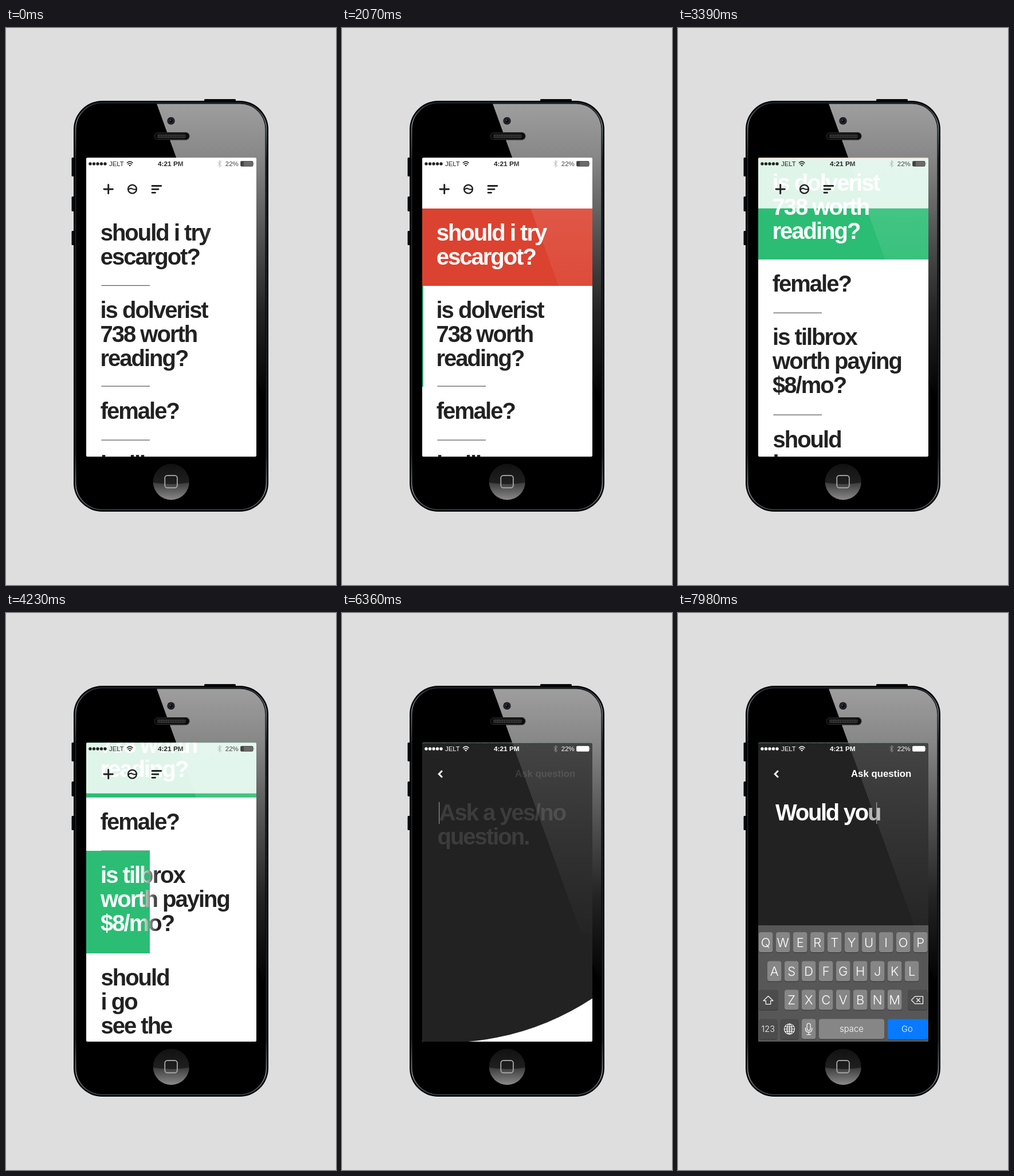
Recreate the animation shown at these times as an HTML page. Size 576 px wide and 972 px high, loop 8000 ms.

```html
<!DOCTYPE html>
<html lang="en">
<head>
<meta charset="utf-8">
<title>Yes/no questions</title>
<style>
html, body { margin: 0; width: 100%; height: 100%; overflow: hidden; background: #dedede; }
svg { display: block; width: 100vw; height: 100vh; }
text { font-family: "Liberation Sans", Arial, sans-serif; white-space: pre; }
.big { font-size: 40px; font-weight: 700; letter-spacing: -2px; }
.key { font-family: Inter, "Liberation Sans", sans-serif; font-weight: 300; fill: #fff; text-anchor: middle; }
.line { fill: none; stroke-linecap: round; stroke-linejoin: round; }
</style>
</head>
<body>
<svg viewBox="0 0 576 972" xmlns="http://www.w3.org/2000/svg">
  <defs>
    <clipPath id="screen"><rect x="140" y="226.5" width="297" height="521.5" rx="2"/></clipPath>
    <clipPath id="reveal"><circle id="hole" cx="179" cy="281" r="0"/></clipPath>
    <clipPath id="face"><rect x="123.5" y="132.5" width="329" height="707" rx="44"/></clipPath>
    <clipPath id="home"><circle cx="288.3" cy="792" r="31.5"/></clipPath>
    <linearGradient id="bezelGlare" gradientUnits="userSpaceOnUse" x1="0" y1="132" x2="0" y2="650">
      <stop offset="0" stop-color="#fff" stop-opacity=".62"/>
      <stop offset=".18" stop-color="#fff" stop-opacity=".53"/>
      <stop offset=".42" stop-color="#fff" stop-opacity=".34"/>
      <stop offset=".7" stop-color="#fff" stop-opacity=".14"/>
      <stop offset="1" stop-color="#fff" stop-opacity="0"/>
    </linearGradient>
    <linearGradient id="screenGlare" gradientUnits="userSpaceOnUse" x1="0" y1="226" x2="0" y2="560">
      <stop offset="0" stop-color="#fff" stop-opacity=".155"/>
      <stop offset=".5" stop-color="#fff" stop-opacity=".075"/>
      <stop offset="1" stop-color="#fff" stop-opacity=".01"/>
    </linearGradient>
    <linearGradient id="rim" gradientUnits="userSpaceOnUse" x1="0" y1="131" x2="0" y2="841">
      <stop offset="0" stop-color="#20282c"/>
      <stop offset=".05" stop-color="#6f7e88"/>
      <stop offset=".14" stop-color="#1c2428"/>
      <stop offset=".86" stop-color="#1a2226"/>
      <stop offset=".95" stop-color="#7d878d"/>
      <stop offset="1" stop-color="#394247"/>
    </linearGradient>
    <linearGradient id="homeTop" x1="0" y1="0" x2="0" y2="1">
      <stop offset="0" stop-color="#111"/><stop offset="1" stop-color="#2c2c2c"/>
    </linearGradient>
    <linearGradient id="homeLow" x1="0" y1="0" x2="0" y2="1">
      <stop offset="0" stop-color="#3a3a3a"/><stop offset="1" stop-color="#8e8e8e"/>
    </linearGradient>
    <pattern id="mesh" width="3" height="3" patternUnits="userSpaceOnUse">
      <rect width="3" height="3" fill="#151515"/><circle cx="1.5" cy="1.5" r=".95" fill="#5a5a5a"/>
    </pattern>
  </defs>

  <rect width="576" height="972" fill="#dedede"/>

  <g fill="#080b0d">
    <rect x="114.5" y="226" width="8" height="33" rx="1.5"/>
    <rect x="114.5" y="294" width="8" height="26" rx="1.5"/>
    <rect x="114.5" y="354" width="8" height="25" rx="1.5"/>
    <rect x="346" y="124" width="55" height="8" rx="1.5"/>
  </g>
  <rect x="118" y="127" width="340" height="717" rx="50" fill="#020303"/>
  <rect x="121.5" y="130.5" width="333" height="710" rx="46.5" fill="none" stroke="url(#rim)" stroke-width="1.8"/>
  <rect x="123.5" y="132.5" width="329" height="707" rx="44" fill="#000"/>
  <path d="M263 132H453V650H450.7Z" fill="url(#bezelGlare)" clip-path="url(#face)"/>

  <circle cx="288" cy="162" r="6.6" fill="#161616"/>
  <circle cx="288" cy="162" r="4" fill="#05070a" stroke="#3b3f45" stroke-width="1.2"/>
  <circle cx="287" cy="161" r="1.5" fill="#3d4a66"/>
  <rect x="258" y="182" width="62.5" height="13.5" rx="6.7" fill="#0b0b0b"/>
  <rect x="259" y="183" width="60.5" height="11.5" rx="5.7" fill="none" stroke="#2c2c2c"/>
  <rect x="264" y="185" width="50" height="7.5" rx="3.7" fill="url(#mesh)"/>

  <g clip-path="url(#home)">
    <rect x="256" y="760" width="65" height="64" fill="url(#homeTop)"/>
    <path d="M256 793Q288.5 799 321 793V825H256Z" fill="url(#homeLow)"/>
  </g>
  <rect x="277.3" y="780.8" width="21.6" height="21.6" rx="4.5" fill="none" stroke="#b0b0b0" stroke-width="1.7"/>

  <g clip-path="url(#screen)">
    <rect x="140" y="226" width="297" height="523" fill="#fff"/>
    <g id="list"></g>
    <rect x="140" y="226" width="297" height="88.8" fill="#fff" fill-opacity=".85"/>
    <g id="lightBar"></g>
    <g class="line" stroke="#222">
      <path d="M171 281.2h15.4M178.7 273.5v15.4" stroke-width="2.9"/>
      <circle cx="220.5" cy="281.2" r="7.4" stroke-width="2.4"/>
      <path d="M213.5 282.3Q217 278.4 220.5 280.6T227.5 281" stroke-width="2.1"/>
      <path d="M255 275.5h15.8M255 281.4h11M255 287.3h5.6" stroke-width="2.8"/>
    </g>
    <g id="dark" clip-path="url(#reveal)">
      <rect x="140" y="226" width="297" height="523" fill="#222"/>
      <g id="darkBar"></g>
      <path id="plus" d="M171 281.2h15.4M178.7 273.5v15.4" class="line" stroke="#fff" stroke-width="2.9"/>
      <path id="back" d="M174.8 275.3L169.2 281L174.8 286.7" fill="none" stroke="#fff" stroke-width="3"/>
      <text id="ask" x="302" y="286.3" font-size="16.8" font-weight="700">Ask question</text>
      <g id="hint" fill="#3c3c3c">
        <text class="big" x="169.5" y="362">Ask a yes/no</text>
        <text class="big" x="166.5" y="404">question.</text>
      </g>
      <text id="typed" class="big" x="170" y="362" fill="#fff" style="letter-spacing:-2.3px"></text>
      <rect id="caret" y="330" width="1" height="38" fill="#aaa"/>
      <g id="keys"></g>
    </g>
    <path d="M297 226H438V560H417.8Z" fill="url(#screenGlare)"/>
  </g>
</svg>
<script>
const $ = id => document.getElementById(id);
const LOOP = 8000, STEP = 30, LEFT = 140, RIGHT = 437;
const clamp = v => Math.max(0, Math.min(1, v));
const span = (t, start, dur) => clamp((t - start) / dur);
const inOut = p => p < .5 ? 8 * p ** 4 : 1 - 8 * (1 - p) ** 4;

const rows = [
  { y: 315, end: 450.3, x: 164.7, lines: ["should i try", "escargot?"], color: "#dc4230", start: 935, dur: 345, fromRight: true },
  { y: 450.3, end: 626, x: 164.5, lines: ["is dolverist", "738 worth", "reading?"], color: "#2bbd73", start: 1999, dur: 411 },
  { y: 626, end: 720, x: 164.7, lines: ["female?"] },
  { y: 719.2, end: 898, x: 165.1, lines: ["is tilbrox", "worth paying", "$8/mo?"], color: "#2bbd73", start: 4039, dur: 411 },
  { y: 898.5, end: 1160, x: 165.5, lines: ["should", "i go", "see the"] }
];

function rowMarkup(row, i) {
  const paint = row.color ? `url(#ink${i})` : "#222";
  const text = row.lines.map((s, n) =>
    `<text class="big" x="${row.x}" y="${row.y + 55.7 + n * 42}" fill="${paint}">${s}</text>`).join("");
  const rule = `<rect x="166.5" y="${row.end - 1.5}" width="84.5" height="1.2" fill="#555"/>`;
  if (!row.color) return rule + text;
  const [a, b] = row.fromRight ? ["#222", "#fff"] : ["#fff", "#222"];
  return `<linearGradient id="ink${i}" gradientUnits="userSpaceOnUse" y1="0" y2="0">
    <stop offset="0" stop-color="${a}"/><stop offset="1" stop-color="${b}"/></linearGradient>` + rule +
    `<rect id="fill${i}" y="${row.y}" height="${row.end - row.y}" fill="${row.color}" shape-rendering="crispEdges"/>` + text;
}

function statusBar(ink, soft, cell) {
  const dots = [0, 1, 2, 3, 4].map(i => `<circle cx="${147 + i * 6.5}" cy="237" r="2.7"/>`).join("");
  return `<g fill="${ink}">${dots}
    <text x="180" y="241" font-size="11.4">JELT</text>
    <text x="265" y="241" font-size="11.8" font-weight="700">4:21 PM</text>
    <text x="382.8" y="241" font-size="11.5">22%</text>
    <path d="M214.2 239.6Q216.2 238 218.2 239.6L216.2 241.6Z"/></g>
    <path class="line" stroke="${ink}" stroke-width="1.5" d="M211.4 235.2Q216.2 230.8 221 235.2M213 237.6Q216.2 234.8 219.4 237.6"/>
    <path class="line" stroke="${soft}" d="M369.8 234l6 5.8-3 2.8v-11.4l3 2.8-6 5.8"/>
    <rect x="409.6" y="232.6" width="21.4" height="8.6" rx="1.2" fill="${cell}" stroke="${ink}" stroke-width=".9"/>
    <rect x="410" y="233" width="5" height="7.8" fill="${ink}"/>
    <path d="M432 235.2q1.4 1.6 0 3.2z" fill="${ink}"/>`;
}

function keyBox(x, y, w, fill, label = "", size = 22) {
  return `<rect x="${x}" y="${y + 1.2}" width="${w}" height="35" rx="4" fill="#3b3b3b"/>
    <rect x="${x}" y="${y}" width="${w}" height="35" rx="4" fill="${fill}"/>
    <text class="key" x="${x + w / 2}" y="${y + 17.5 + size * .365}" font-size="${size}">${label}</text>`;
}

function keyboard() {
  const pale = "#868686", deep = "#4c4c4c";
  const letters = (s, x, y) => [...s].map((c, i) => keyBox(x + i * 30, y, 24.4, pale, c)).join("");
  return `<rect x="140" y="545" width="297" height="204" fill="#575757"/>` +
    letters("QWERTYUIOP", 141, 557) + letters("ASDFGHJKL", 156, 607.5) + letters("ZXCVBNM", 186, 657.5) +
    keyBox(141, 657.5, 34, deep) + keyBox(401, 657.5, 34.5, deep) +
    keyBox(141, 708.5, 32.5, deep, "123", 14.5) + keyBox(178.5, 708.5, 32, deep) + keyBox(216, 708.5, 24.4, pale) +
    keyBox(246, 708.5, 114, pale, "space", 14.8) + keyBox(366, 708.5, 70, deep) +
    `<rect id="goFill" x="366" y="708.5" width="70" height="35.5" rx="4" fill="#087aff"/>
    <text id="go" class="key" x="400" y="731.3" font-size="14.8">Go</text>
    <g class="line" stroke="#fff" stroke-width="1.2">
      <path d="M157.5 668.5l8.5 8.2h-4.3v6h-8.4v-6h-4.3z"/>
      <path d="M407.5 675.5l6-6.3h14v12.6h-14zM416.5 672.5l6 6M422.5 672.5l-6 6"/>
      <circle cx="194.5" cy="726" r="9"/><ellipse cx="194.5" cy="726" rx="4.2" ry="9"/>
      <path d="M194.5 717v18M185.5 726h18M187.2 721.3q7.3 2.6 14.6 0M187.2 730.7q7.3-2.6 14.6 0"/>
      <rect x="225.2" y="716" width="6" height="12.5" rx="3"/>
      <path d="M222.6 724v2.2q0 5.2 5.6 5.2t5.6-5.2V724M228.2 731.4v4M225 735.6h6.4"/>
    </g>`;
}

$("list").innerHTML = rows.map(rowMarkup).join("");
$("lightBar").innerHTML = statusBar("#222", "#a5a5a5", "#505050");
$("darkBar").innerHTML = statusBar("#fff", "#858585", "#fff");
$("keys").innerHTML = keyboard();

const phrase = "Would you";
$("typed").innerHTML = [...phrase].map(c => `<tspan>${c}</tspan>`).join("");
const letters = [...$("typed").children];
const stops = [...phrase, ""].map((_, i) => i ? $("typed").getSubStringLength(0, i) : 0);

const set = (id, attrs) => { for (const k in attrs) $(id).setAttribute(k, attrs[k]); };

function drawSwipe(row, i, t) {
  const p = inOut(span(t, row.start, row.dur)), w = (RIGHT - LEFT) * p;
  const edge = row.fromRight ? RIGHT - w : LEFT + w;
  set("fill" + i, { x: row.fromRight ? edge : LEFT, width: w });
  set("ink" + i, { x1: edge - 15, x2: edge + 15 });
}

function draw(t) {
  rows.forEach((row, i) => row.color && drawSwipe(row, i, t));
  set("list", { transform: `translate(0 ${-304 * inOut(span(t, 3030, 630))})` });

  // The pressed button grows into the dark page.
  const press = span(t, 5670, 60);
  set("hole", { r: t < 5700 ? 0 : 22 + 540 * inOut(span(t, 5927, 702)) });
  set("dark", { opacity: press });
  const swap = span(t, 6000, 180);
  set("plus", { opacity: 1 - swap });
  set("back", { opacity: swap });

  const up = 1 - (1 - span(t, 6660, 120)) ** 2;
  set("keys", { transform: `translate(0 ${204 * (1 - up)})` });

  const n = Math.max(0, (t - 7500) / 55);
  letters.forEach((el, i) => el.setAttribute("fill-opacity", clamp((n - i) / 1.1)));
  const at = Math.min(Math.floor(n), phrase.length - 1);
  const caret = stops[at] + (stops[at + 1] - stops[at]) * clamp(n - at);
  set("caret", { x: 169.2 + caret, opacity: swap });
  set("hint", { opacity: n > 0 ? 0 : swap });

  const ready = span(t, 7500, 120), tone = 60 + 195 * ready;
  set("ask", { fill: `rgb(${tone},${tone},${tone})`, opacity: swap });
  set("goFill", { opacity: ready });
  set("go", { "fill-opacity": .45 + .55 * ready });
}

const begin = performance.now();
function frame(now) {
  const t = Math.max(0, now - begin) % LOOP;
  draw(Math.floor(t / STEP) * STEP);
  requestAnimationFrame(frame);
}
draw(0);
requestAnimationFrame(frame);
</script>
</body>
</html>
```
